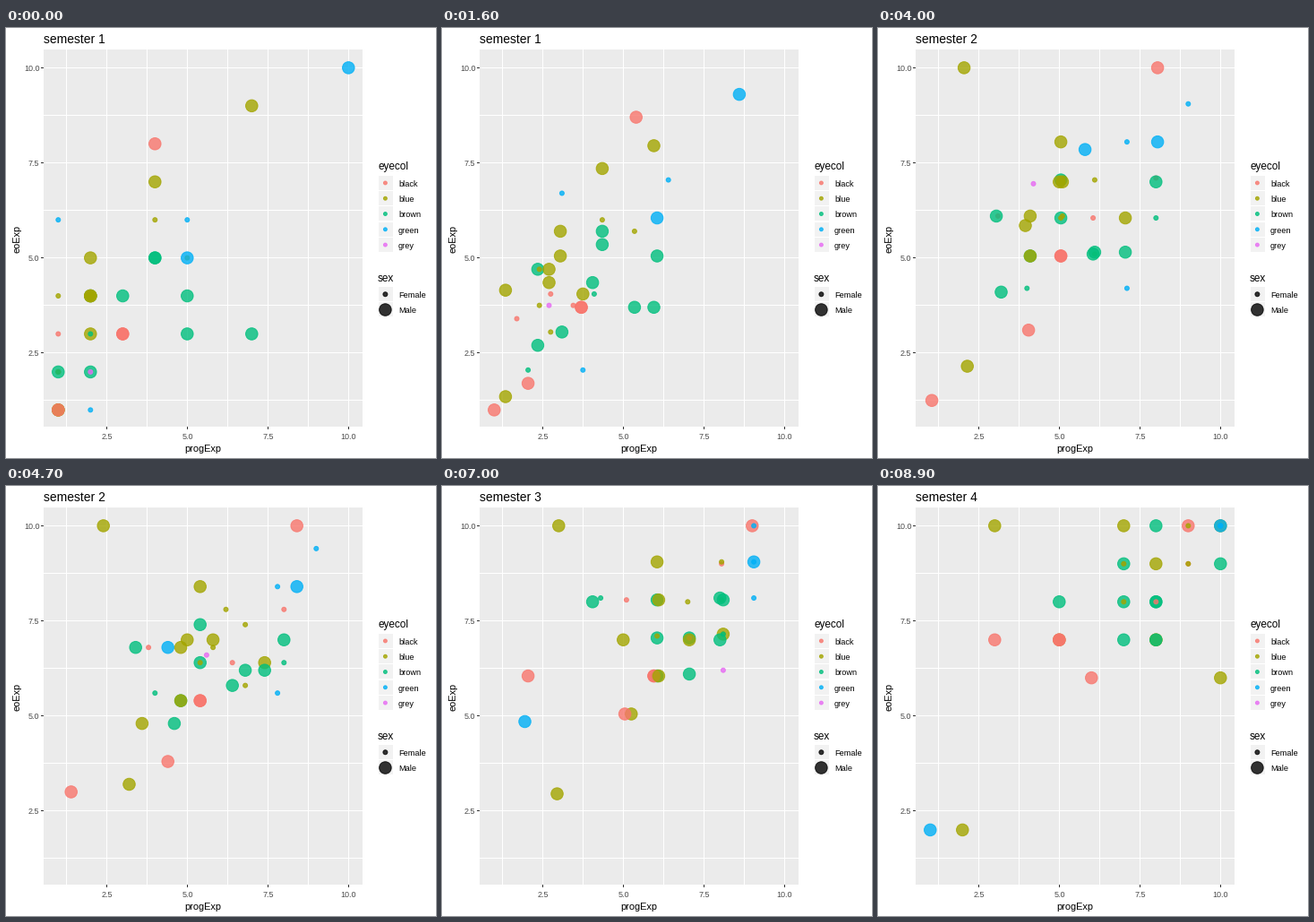
Animation of 480 by 480 pixels, one loop 10000 ms. Source, as a matplotlib script:

```python
import numpy as np
import matplotlib.pyplot as plt
from matplotlib.animation import FuncAnimation
from matplotlib.colors import to_rgba
from matplotlib.patches import Rectangle

SIZE, DPI = 480, 100
PT = 72 / DPI  # points per pixel
HOLD, MOVE, FRAMES = 10, 20, 100
ALPHA = 0.8
RADIUS = {"Female": 2.49, "Male": 6.75}
EYES = {"black": "#F8766D", "blue": "#A3A500", "brown": "#00BF7D",
        "green": "#00B0F6", "grey": "#E76BF3"}

# Each row holds x, y for semesters 1 to 4; layers go from back to front.
BACK = [
    ("black", "Male", [(4, 8, 8, 10, 9, 10, 9, 10)]),
    ("black", "Female", [(1, 2, 3, 6, 5, 8, 7, 9), (1, 2, 8, 7, 8, 9, 9, 9)]),
    ("green", "Female", [(1, 6, 7, 8, 9, 9, 10, 10)]),
    ("blue", "Female", [(1, 2, 5, 7, 8, 9, 9, 10), (1, 2, 6, 5, 8, 7, 10, 10),
                        (5, 5, 6, 7, 8, 8, 9, 9)]),
    ("brown", "Female", [(1, 1, 4, 4, 4, 8, 10, 10)]),
    ("brown", "Male", [(7, 3, 4, 5, 6, 6, 7, 7), (2, 4, 3, 6, 4, 8, 5, 8),
                       (2, 2, 3, 4, 7, 6, 8, 8), (4, 5, 5, 7, 6, 8, 7, 9),
                       (4, 5, 5, 6, 6, 7, 7, 8), (5, 3, 6, 5, 8, 8, 8, 10),
                       (3, 4, 6, 5, 7, 7, 8, 8)]),
]
MIDDLE = [
    ("black", "Male", [(1, 1, 1, 1, 2, 6, 3, 7)]),
    ("blue", "Male", [(1, 1, 2, 2, 5, 5, 10, 6), (1, 1, 2, 10, 3, 10, 3, 10),
                      (2, 5, 5, 7, 5, 7, 5, 7)]),
    ("black", "Male", [(3, 3, 5, 5, 6, 6, 5, 7), (3, 3, 5, 5, 6, 6, 5, 7),
                       (1, 1, 4, 3, 5, 5, 6, 6)]),
    ("blue", "Female", [(1, 4, 5, 6, 7, 8, 7, 8), (4, 6, 5, 6, 6, 7, 7, 9)]),
    ("black", "Female", [(1, 3, 6, 6, 7, 7, 8, 8)]),
    ("grey", "Female", [(2, 2, 4, 7, 8, 6, 10, 10)]),
    ("blue", "Male", [(2, 3, 7, 6, 8, 7, 10, 10)]),
]
FRONT = [
    ("brown", "Female", [(2, 3, 8, 6, 8, 7, 10, 10)]),
    ("blue", "Male", [(7, 9, 4, 6, 6, 8, 8, 9), (2, 4, 5, 7, 7, 7, 8, 7),
                      (2, 4, 4, 6, 3, 3, 2, 2), (2, 4, 4, 5, 6, 6, 8, 7),
                      (4, 7, 5, 8, 6, 9, 7, 10)]),
    ("brown", "Male", [(1, 2, 7, 5, 8, 8, 10, 9), (5, 4, 8, 7, 8, 7, 8, 7)]),
    ("green", "Male", [(10, 10, 6, 8, 2, 5, 1, 2)]),
    ("green", "Female", [(5, 6, 9, 9, 9, 10, 10, 10), (2, 1, 7, 4, 9, 8, 10, 10)]),
    ("green", "Male", [(5, 5, 8, 8, 9, 9, 10, 10)]),
]

plt.rcParams["font.family"] = "Liberation Sans"
fig = plt.figure(figsize=(SIZE / DPI, SIZE / DPI), dpi=DPI, facecolor="white")
ax = fig.add_axes([0, 0, 1, 1])
ax.set(xlim=(0, SIZE), ylim=(SIZE, 0))
ax.axis("off")


def px(v):
    return 22.3 + 36 * v


def py(v):
    return 468.8 - 42.44 * v


def box(x, y, w, h, color):
    ax.add_patch(Rectangle((x, y), w, h, fc=color, lw=0, antialiased=False, zorder=1))


def label(x, y, s, size, color="black", ha="left", va="baseline", **kw):
    return ax.text(x, y, s, size=size * PT, color=color, ha=ha, va=va, **kw)


def dots(xy, radii, colors):
    rgba = [to_rgba(c, ALPHA) for c in colors]
    return ax.scatter(*np.transpose(xy), s=(2 * np.array(radii) * PT) ** 2,
                      facecolors=rgba, edgecolors=rgba, linewidths=PT, zorder=3)


def draw_panel():
    box(42, 24, 356, 421, "#EBEBEB")
    for v in np.arange(1.25, 10.1, 1.25):
        x, y = int(px(v)), int(py(v))
        box(x, 24, 1, 421, "white")
        box(42, y, 356, 1, "white")
        if v % 2.5 == 0:
            box(x, 445, 1, 3, "#333333")
            box(39, y, 3, 1, "#333333")
            label(x + 0.5, 459, f"{v:.1f}", 9, "#4D4D4D", ha="center")
            label(37.5, y + 4, f"{v:.1f}", 9, "#4D4D4D", ha="right")
    label(220, 473, "progExp", 11, ha="center")
    label(12.5, 235.5, "eoExp", 11, ha="center", va="center", rotation=90)


def draw_legend(title, base, top, names, radii, colors):
    label(415, base, title, 11.8)
    ys = top + 17.28 * (np.arange(len(names)) + 0.5)
    for name, y in zip(names, ys):
        box(416, round(y - 8.1), 16, 16, "#F2F2F2")
        label(438, y + 3.9, name, 9.2)
    dots([(423.4, y) for y in ys], radii, colors)


draw_panel()
draw_legend("eyecol", 158, 164.3, list(EYES), [1.95] * 5, EYES.values())
draw_legend("sex", 283, 288.6, list(RADIUS), list(RADIUS.values()), ["black"] * 2)
title = label(42, 17, "semester 1", 13.9)

people = [(eye, sex, path) for eye, sex, paths in BACK + MIDDLE + FRONT for path in paths]
tracks = np.array([p[2] for p in people], float).reshape(-1, 4, 2)
points = dots(tracks[:, 0], [RADIUS[p[1]] for p in people], [EYES[p[0]] for p in people])


def update(n):
    pos = tracks[:, 0].copy()
    term = 1
    for i in range(3):
        start = HOLD - 1 + i * (HOLD + MOVE)
        t = np.clip((n - start) / MOVE, 0, 1)
        pos += t * (tracks[:, i + 1] - tracks[:, i])
        term += int(t > 0.5)
    points.set_offsets(np.column_stack([px(pos[:, 0]), py(pos[:, 1])]))
    title.set_text(f"semester {term}")
    return points, title


anim = FuncAnimation(fig, update, frames=FRAMES, interval=100, repeat=True,
                     repeat_delay=0, blit=False)
plt.show()
```
